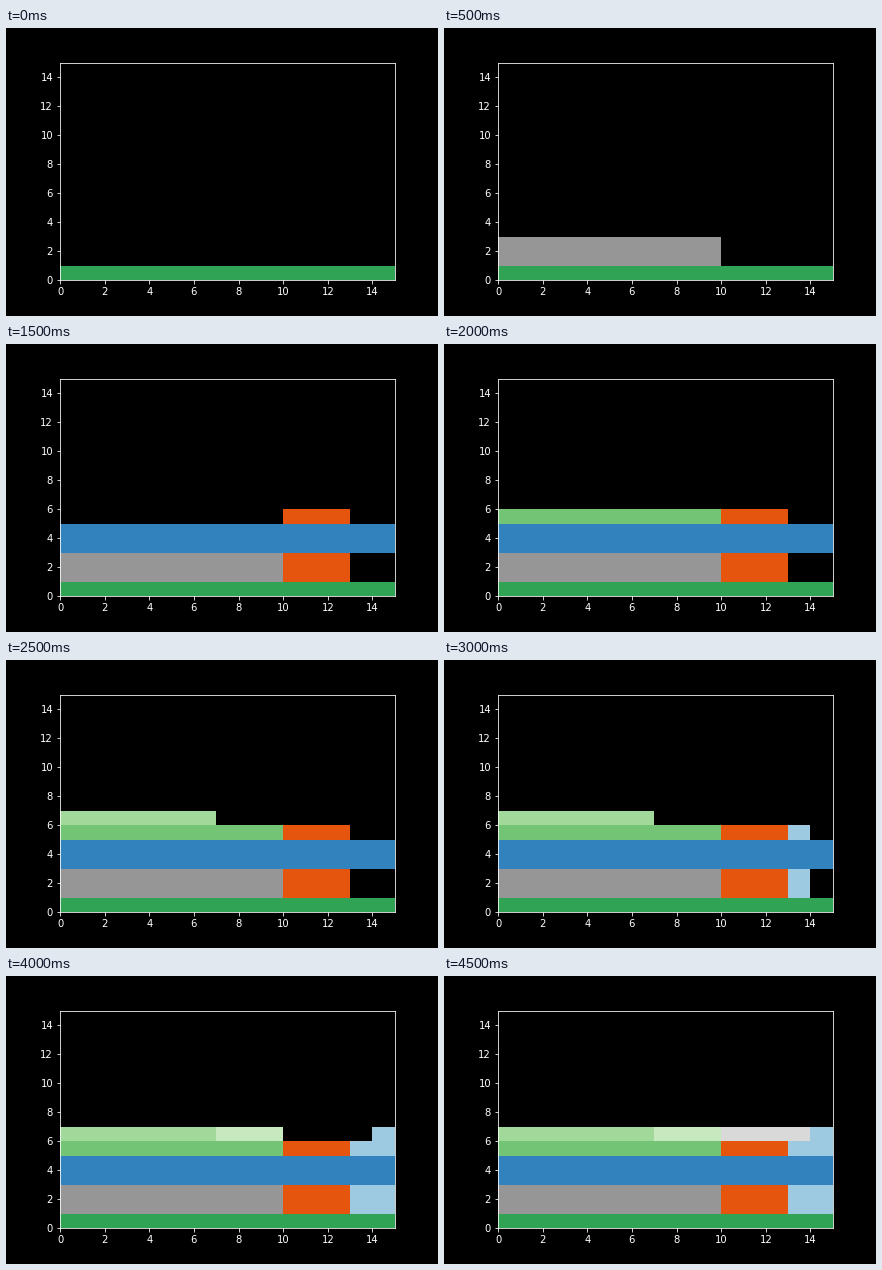
Write a matplotlib script that moves like this. It is 432x288 px and loops after 5000 ms.

```python
import matplotlib.pyplot as plt
from matplotlib.animation import FuncAnimation
from matplotlib.patches import Rectangle

STEP_MS = 500

# One entry per step: colour, then blocks as (x0, y0, x1, y1)
STEPS = [
    ("#31a354", [(0, 0, 15, 1)]),
    ("#969696", [(0, 1, 10, 3)]),
    ("#3182bd", [(0, 3, 15, 5)]),
    ("#e6550d", [(10, 1, 13, 3), (10, 5, 13, 6)]),
    ("#74c476", [(0, 5, 10, 6)]),
    ("#a1d99b", [(0, 6, 7, 7)]),
    ("#9ecae1", [(13, 1, 14, 3), (13, 5, 14, 6)]),
    ("#9ecae1", [(14, 1, 15, 3), (14, 5, 15, 7)]),
    ("#c7e9c0", [(7, 6, 10, 7)]),
    ("#d9d9d9", [(10, 6, 14, 7)]),
]

plt.style.use("dark_background")
plt.rcParams.update({"font.family": "DejaVu Sans", "font.size": 10})

fig, ax = plt.subplots(figsize=(6, 4), dpi=72)
fig.subplots_adjust(left=0.125, right=0.9, bottom=0.125, top=0.88)
ax.set_xlim(0, 15)
ax.set_ylim(0, 15)
ax.set_xticks(range(0, 15, 2))
ax.set_yticks(range(0, 15, 2))

layers = [
    [
        ax.add_patch(Rectangle((x0, y0), x1 - x0, y1 - y0, fc=color, ec="none", lw=0))
        for x0, y0, x1, y1 in blocks
    ]
    for color, blocks in STEPS
]


def update(step):
    for i, layer in enumerate(layers):
        for patch in layer:
            patch.set_visible(i <= step)
    return [patch for layer in layers for patch in layer]


anim = FuncAnimation(
    fig,
    update,
    frames=len(STEPS),
    init_func=lambda: update(0),
    interval=STEP_MS,
    repeat=True,
    repeat_delay=0,
)

plt.show()
```
